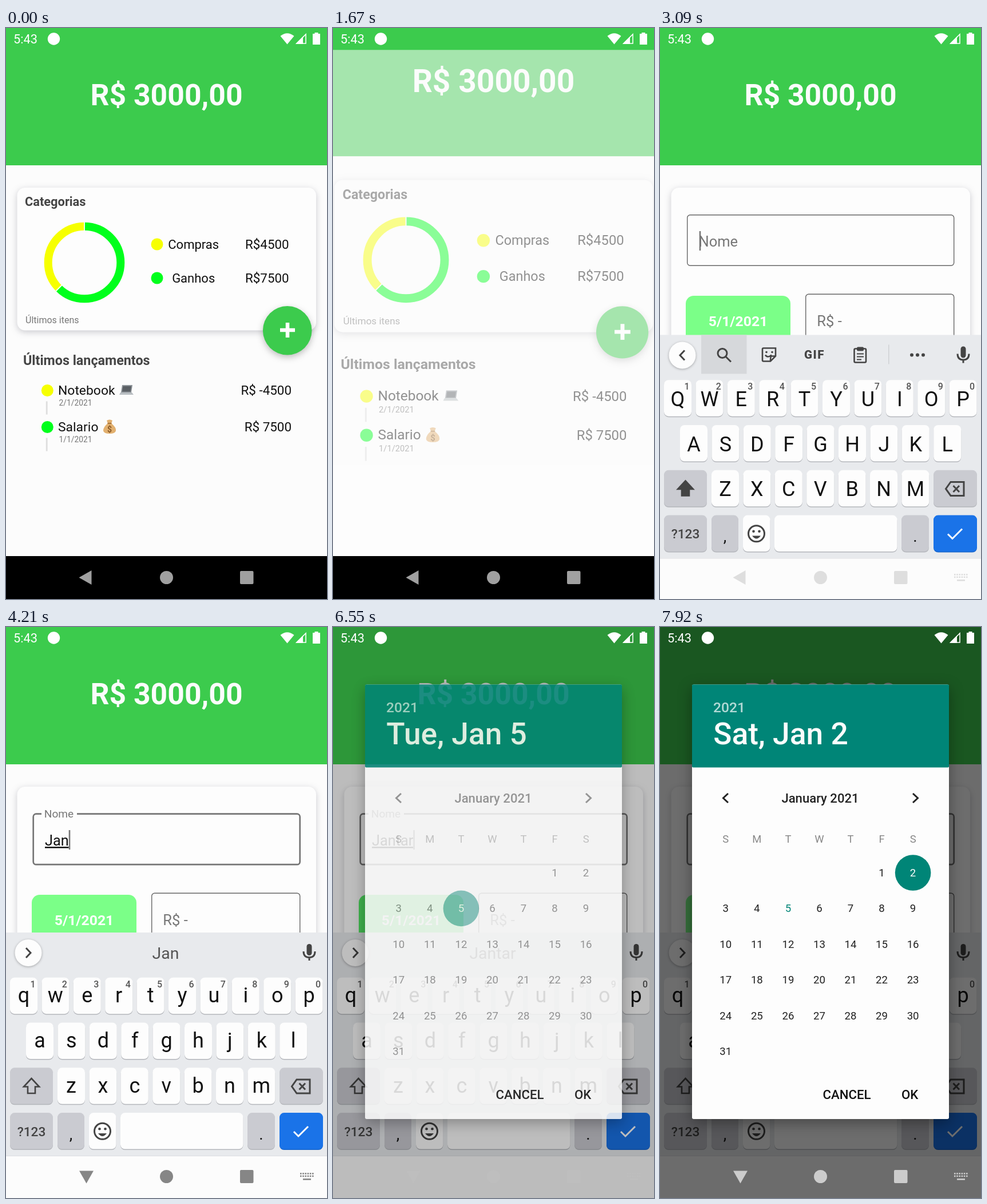
Recreate the animation shown at these times as an HTML page. Size 561 by 998 pixels, loop 8 s.

```html
<!DOCTYPE html>
<html lang="pt">
<head>
<meta charset="utf-8">
<title>Finanças</title>
<style>
html, body { margin: 0; width: 100%; height: 100%; overflow: hidden; background: #fcfcfc; }
svg { display: block; width: 100%; height: 100%; }
text { font-family: Roboto, sans-serif; white-space: pre; }
.card { filter: drop-shadow(0 3px 6px rgba(50, 50, 70, .25)); }
.fab { filter: drop-shadow(0 4px 6px rgba(0, 0, 0, .25)); }
.knob { filter: drop-shadow(0 1px 2px rgba(0, 0, 0, .3)); }
.dialog { filter: drop-shadow(0 7px 12px rgba(0, 0, 0, .35)); }
.line { fill: none; stroke: #444; stroke-width: 3; }
.thin { stroke-width: 2.6; }
</style>
</head>
<body>
<svg id="stage" viewBox="0 0 561 998"></svg>
<script>
const LOOP = 8000;
const GREEN = '#3ccb4d', YELLOW = '#f6ff00', LIME = '#00ff1c', TEAL = '#008577';
const WORD = 'Jantar';
const KEY_TIMES = [3560, 3860, 4090, 4340, 4700, 5048];
const FOCUS = 3080, PRESS = 6400, DIALOG = 6460, PICK = 7250;

const text = (x, y, size, str, fill = '#111', extra = '') =>
  `<text x="${x}" y="${y}" font-size="${size}" fill="${fill}" ${extra}>${str}</text>`;
const rect = (x, y, w, h, fill, r = 0, extra = '') =>
  `<rect x="${x}" y="${y}" width="${w}" height="${h}" rx="${r}" fill="${fill}" ${extra}/>`;
const circle = (x, y, r, fill, extra = '') =>
  `<circle cx="${x}" cy="${y}" r="${r}" fill="${fill}" ${extra}/>`;
const path = (d, extra = 'class="line"') => `<path d="${d}" ${extra}/>`;
const BOLD = 'font-weight="700"', MEDIUM = 'font-weight="500"';
const MID = 'text-anchor="middle"', END = 'text-anchor="end"';

const header = () =>
  rect(0, 0, 561, 998, '#fcfcfc') + rect(0, 0, 561, 240, GREEN) +
  text(280.5, 134.5, 51.7, 'R$ 3000,00', '#fcfcfc', `${BOLD} ${MID}`);

const legend = (y, name, amount, color) =>
  circle(264, y, 10.5, color) + text(327.7, y + 7.5, 22, name, '#111', MID) +
  text(494.5, y + 7.5, 22.3, amount, '#111', END);

const entry = (y, name, date, amount, color) =>
  circle(72.3, y, 10.5, color) + rect(69.8, y + 19, 2.8, 23, '#dedede') +
  text(91, y + 7, 22.9, name) + text(92.5, y + 26.5, 13.8, date, '#777') +
  text(499, y + 7.5, 22.4, amount, '#111', END);

const arc = (color, len, offset) =>
  circle(137, 410, 63.3, 'none', `stroke="${color}" stroke-width="14" pathLength="100"
    stroke-dasharray="${len} 100" stroke-dashoffset="${-offset}" transform="rotate(-90 137 410)"`);

const laptop =
  path('M203 624H221L219 637H201Z', 'fill="#8d9398"') +
  path('M204.5 626H219L217.5 635.5H203Z', 'fill="#5a5f64"') +
  path('M200 637H220L223 641H198Z', 'fill="#b9bec2"');

const moneyBag =
  path('M176 686Q181 683 186 686L184 691Q193 698 192 704Q191 709 181 709Q171 709 170 704Q170 697 178 691Z', 'fill="#e2b06f"') +
  path('M177.5 691H184.5', 'stroke="#a8743a" stroke-width="2"') +
  text(181, 706, 14, '$', '#8a5a28', `${MID} ${BOLD}`);

const home = header() +
  rect(19.5, 279, 522.5, 249.5, '#fdfdfd', 14, 'class="card"') +
  text(33, 310.5, 21.8, 'Categorias', '#454545', BOLD) +
  arc(LIME, 62.5, 0) + arc(YELLOW, 37.5, 62.5) +
  path('M137 338V356M98 449L85 462', 'stroke="#fdfdfd" stroke-width="1.8"') +
  legend(378, 'Compras', 'R$4500', YELLOW) + legend(437, 'Ganhos', 'R$7500', LIME) +
  text(34, 516, 16, 'Últimos itens', '#777') +
  circle(491.7, 528.7, 42.8, GREEN, 'class="fab"') +
  path('M479 528H505M492 515V541', 'stroke="#fff" stroke-width="6.5"') +
  text(30, 588.5, 23.3, 'Últimos lançamentos', '#454545', BOLD) +
  entry(633.5, 'Notebook', '2/1/2021', 'R$ -4500', YELLOW) + laptop +
  entry(697.5, 'Salario', '1/1/2021', 'R$ 7500', LIME) + moneyBag;

const form = header() +
  rect(19.5, 279, 522.5, 361, '#fdfdfd', 14, 'class="card"') +
  rect(47.7, 326.7, 466, 88.5, 'none', 5, 'id="field"') +
  rect(62, 322, 62, 8, '#fdfdfd', 0, 'id="notch"') +
  text(0, 0, 25.5, 'Nome', '#777', 'id="label"') +
  text(68, 382, 25.3, '', '#111', 'id="name" text-decoration="underline"') +
  rect(0, 355, 2.6, 34, '#777', 0, 'id="caret"') +
  rect(45, 468, 183, 88, '', 14, 'id="date"') +
  text(136.5, 521, 24.7, '5/1/2021', '#fff', `${BOLD} ${MID}`) +
  rect(254.7, 465.2, 259, 89, 'none', 5, 'stroke="#666" stroke-width="1.4"') +
  text(274.3, 521, 25.5, 'R$ -', '#777');

const PITCH = 55.4;
const key = (x, y, w = 48, fill = '#fdfdfd', edge = '#b4b6bb') =>
  rect(x, y + 1.5, w, 63.5, edge, 8) + rect(x, y, w, 63.5, fill, 8);
const ROWS = [['qwertyuiop', 7, 612.7], ['asdfghjkl', 35, 691.5], ['zxcvbnm', 90, 770.3]];
const LAST = 849.1;
const GREY = '#cacbd1';
const letters = (drop, change) => ROWS.map(([row, x, y]) => [...row].map((c, i) =>
  text(x + 24 + i * PITCH, y + drop, 36, change(c), '#111', MID)).join('')).join('');

const keyboard =
  rect(0, 534, 561, 391, '#e8eaed') +
  ROWS.map(([row, x, y]) => [...row].map((c, i) => key(x + i * PITCH, y)).join('')).join('') +
  [...'1234567890'].map((d, i) => text(47 + i * PITCH, 630, 16, d, '#555', `${MID} ${MEDIUM}`)).join('') +
  key(7, 770.3, 75, GREY) + key(478, 770.3, 76, GREY) +
  key(7, LAST, 75, GREY) + key(90, LAST, 47, GREY) + key(145, LAST, 47.5) +
  key(200, LAST, 214.5) + key(422, LAST, 48, GREY) + key(478, LAST, 76, '#1a73e8', '#1765cc') +
  `<g id="upper">${letters(45.6, c => c.toUpperCase())}</g><g id="lower">${letters(43.3, c => c)}</g>` +
  path('M44.5 789L58 803.5H51V815H38V803.5H31Z', 'id="shift" stroke="#444" stroke-width="2.6"') +
  path('M508 791H531V815H508L499.5 803ZM512.5 797.5L523 808.5M523 797.5L512.5 808.5') +
  text(44.5, 889.5, 22.7, '?123', '#444', `${MID} ${MEDIUM}`) +
  text(113.5, 896, 28, ',', '#111', MID) + text(446, 896, 28, '.', '#111', MID) +
  circle(168.5, 881.3, 14, 'none', 'class="line"') +
  circle(163.5, 877.3, 2.3, '#444') + circle(173.5, 877.3, 2.3, '#444') +
  path('M161 885Q168.5 895 176 885Z', 'fill="#444"') +
  path('M503 882L511 890L528 873', 'fill="none" stroke="#fff" stroke-width="3"') +
  rect(525.5, 554, 9, 20, '#444', 4.5) +
  path('M520 567Q520 577.5 530 577.5Q540 577.5 540 567M530 577V583') +
  `<g id="tools">` + rect(72, 534, 79.5, 68, '#d6d8db') +
    circle(109, 566, 8, 'none', 'class="line"') + path('M115 572L124 581') +
    path('M181 557H202V571L193 580H181Q179 580 179 578V559Q179 557 181 557ZM202 571H195Q193 571 193 579M184 569Q188 575 195 569', 'class="line thin"') +
    circle(186, 564, 1.8, '#444') + circle(196, 564, 1.8, '#444') +
    text(270, 575.5, 20.5, 'GIF', '#444', `${MID} font-weight="900" letter-spacing="1.5"`) +
    rect(339.5, 558, 20.5, 24, 'none', 2, 'class="line thin"') + rect(344, 555, 12, 7, '#444', 2) +
    path('M344 567H356M344 572H356M344 577H352', 'stroke="#444" stroke-width="2"') +
    rect(399, 551, 1.5, 34, '#cfd1d4') +
    [440, 450, 460].map(x => circle(x, 569, 3, '#444')).join('') + `</g>` +
  circle(39, 569.5, 23.5, '#fdfdfd', 'class="knob"') +
  path('', 'id="chevron" class="line"') +
  text(279, 580, 28.4, '', '#555', `id="suggest" ${MID}`);

const nav = rect(0, 923, 561, 76, '#000', 0, 'id="navBar"');
const NAV = 'currentColor';
const navIcons = `<g id="navIcons">` +
  path('M127.5 960.5L149.5 948V973Z', `id="back" fill="${NAV}"`) +
  circle(280.5, 960.5, 11.5, NAV) + rect(409, 949, 23.5, 23, NAV, 2) +
  `<g id="ime">` + [954, 958.5].map(y => [0, 1, 2, 3, 4, 5].map(i =>
    rect(514 + i * 4.2, y, 2.6, 2.6, NAV)).join('')).join('') +
  rect(519, 964, 14, 2.6, NAV) + `</g></g>`;

const dayPos = d => [114.8 + 54.55 * ((d + 4) % 7), 429.5 + 62.4 * Math.floor((d + 4) / 7)];
const days = Array.from({ length: 31 }, (_, i) => {
  const [x, y] = dayPos(i + 1);
  return text(x, y + 6.5, 18.6, i + 1, '#222', `${MID} id="day${i + 1}"`);
}).join('');

const dialog =
  rect(56, 100.5, 449, 759.5, '#fdfdfd', 3, 'class="dialog"') +
  rect(56, 100.5, 449, 145, TEAL, 2) +
  text(93, 149, 24.6, '2021', '#b3dad6', MEDIUM) +
  text(93.3, 205, 53.3, '', '#fdfdfd', `id="title" ${MEDIUM}`) +
  `<g id="month">` +
    path('M119 291L110.5 299L119 307M442 291L450.5 299L442 307', 'class="line" style="stroke:#222"') +
    text(280, 306.8, 22.1, 'January 2021', '#222', `${MID} ${MEDIUM}`) +
    [...'SMTWTFS'].map((c, i) => text(114.8 + 54.55 * i, 376.7, 18.4, c, '#888', MID)).join('') +
    circle(0, 0, 31.3, TEAL, 'id="mark"') + days + `</g>` +
  text(326.5, 825, 22.2, 'CANCEL', '#111', `${MID} ${MEDIUM}`) +
  text(436.7, 825, 22.2, 'OK', '#111', `${MID} ${MEDIUM}`);

const status =
  text(13, 27, 21.8, '5:43', '#fff') + circle(83.5, 19, 10.7, '#fff') +
  path('M479.5 14Q491.5 4.5 503.5 14L491.5 28.5Z', 'fill="#fff"') +
  path('M524 11V27H508Z', 'fill="none" stroke="#fff" stroke-width="1.6"') +
  path('M519 15V28H506Z', 'fill="#fff"') +
  path('M539.5 10V8H545.5V10H549V29H536V10Z', 'fill="#fff"');

stage.innerHTML =
  `<defs><clipPath id="app"><rect y="38" width="561" height="886"/></clipPath></defs>` +
  rect(0, 0, 561, 998, '#fcfcfc') +
  `<g clip-path="url(#app)"><g id="form">${form}</g><g id="home">${home}</g></g>` +
  rect(0, 0, 561, 38.3, GREEN) +
  `<g id="keys">${keyboard}</g>${nav}` +
  rect(0, 923, 561, 1, '#dcdee1', 0, 'id="navLine"') +
  rect(0, 0, 561, 998, '#000', 0, 'id="dim"') +
  `${navIcons}<g id="dialog">${dialog}</g>${status}`;

const el = {};
stage.querySelectorAll('[id]').forEach(n => { el[n.id] = n; });
const set = (id, attrs) => { for (const k in attrs) el[id].setAttribute(k, attrs[k]); };
const show = (id, on) => set(id, { display: on ? 'inline' : 'none' });
const ramp = (t, a, b) => Math.min(1, Math.max(0, (t - a) / (b - a)));
const easeOut = (p, n = 3) => 1 - (1 - p) ** n;
const mix = (a, b, p) => a + (b - a) * p;
const grey = v => `rgb(${v},${v},${v})`;
const zoom = s => `translate(280.5 480.5) scale(${s}) translate(-280.5 -480.5)`;

function drawScreens(t) {
  const p = easeOut(ramp(t, 1540, 1800));
  set('home', { transform: zoom(mix(1, 1.075, p)), opacity: 1 - ramp(t, 1595, 1732) });
  set('form', { transform: zoom(mix(0.85, 1, p)), opacity: ramp(t, 1690, 1830) });
  show('home', t < 1732);
  show('form', t > 1690);
}

function drawForm(t, typed) {
  const p = easeOut(ramp(t, 3110, 3260), 2);
  set('field', { stroke: p ? '#757575' : '#666', 'stroke-width': p ? 2.7 : 1.4 });
  show('notch', p > 0.5);
  set('label', { x: mix(67.5, 66.8, p), y: mix(382, 333, p), 'font-size': mix(25.5, 19.1, p) });
  el.name.textContent = typed;
  const last = KEY_TIMES.filter(k => k <= t).pop() || FOCUS;
  show('caret', t >= FOCUS && (t > PRESS || (t - last) % 1000 < 500));
  set('caret', { x: typed ? 68 + el.name.getComputedTextLength() : 68.7 });
  const press = ramp(t, PRESS, 6500) - ramp(t, 6600, 6800);
  set('date', { fill: `rgb(${mix(123, 84, press)},${mix(255, 236, press)},${mix(136, 102, press)})` });
}

function drawKeyboard(t, typed) {
  const dy = 464 * (1 - easeOut(ramp(t, 2860, 3140)));
  const open = t > 2860;
  set('keys', { transform: `translate(0 ${dy})` });
  show('keys', open);
  show('upper', !typed);
  show('lower', typed);
  show('tools', !typed);
  set('shift', { fill: typed ? 'none' : '#444' });
  set('chevron', { d: typed ? 'M35 561L43 569.5L35 578' : 'M43 561L35 569.5L43 578' });
  el.suggest.textContent = typed;

  const y = 923 + (open ? Math.min(dy + 1, 4) : 0);
  set('navBar', { y, fill: grey(mix(0, 252, ramp(t, 2870, 3050))) });
  set('navLine', { y });
  show('navLine', t > 3050);
  let tone = mix(160, 222, ramp(t, 2870, 3090));
  tone = mix(tone, 134, ramp(t, 3090, 3300));
  tone = mix(tone, 190, ramp(t, DIALOG, 6550));
  set('navIcons', { color: grey(mix(tone, 204, ramp(t, 6550, 6680))) });
  set('back', { transform: `rotate(${-90 * ramp(t, 3110, 3300)} 140 960)` });
  show('ime', open);
}

function drawDialog(t) {
  show('dialog', t >= DIALOG);
  set('dialog', { opacity: easeOut(ramp(t, DIALOG, 6610), 2) });
  set('month', { opacity: ramp(t, DIALOG, 6640) });
  set('dim', { opacity: 0.57 * ramp(t, DIALOG, 6665) });
  const picked = t >= PICK;
  el.title.textContent = picked ? 'Sat, Jan 2' : 'Tue, Jan 5';
  const [cx, cy] = dayPos(picked ? 2 : 5);
  set('mark', { cx, cy });
  set('day2', { fill: picked ? '#fdfdfd' : '#222' });
  set('day5', { fill: picked ? TEAL : '#fdfdfd' });
}

function frame() {
  const t = performance.now() % LOOP;
  const typed = WORD.slice(0, KEY_TIMES.filter(k => k <= t).length);
  drawScreens(t);
  drawForm(t, typed);
  drawKeyboard(t, typed);
  drawDialog(t);
  requestAnimationFrame(frame);
}
frame();
</script>
</body>
</html>
```
